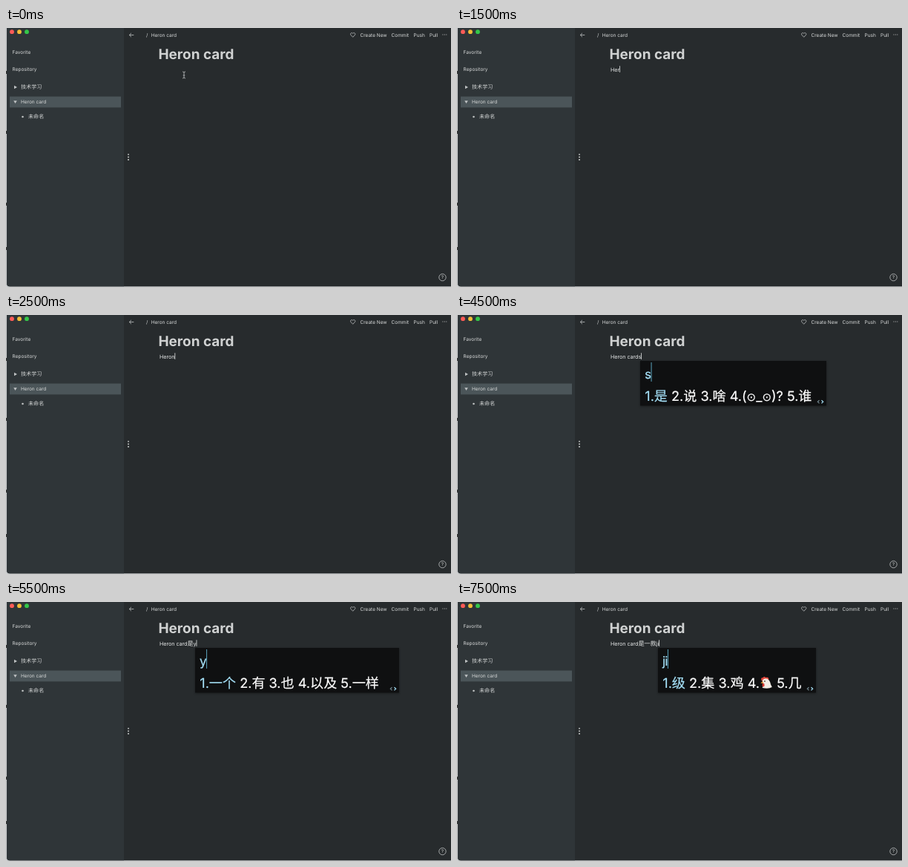
Animation of 600 by 350 pixels, one loop 8000 ms. Source, as an HTML page:

```html
<!DOCTYPE html>
<html lang="en">
<head>
<meta charset="utf-8">
<title>Note editor</title>
<style>
  html, body { margin: 0; width: 600px; height: 350px; overflow: hidden; background: #272b2d; }
  svg { display: block; }
  text { font-family: Inter, 'DejaVu Sans', 'Noto Sans CJK SC', 'Noto Sans CJK', sans-serif; fill: #d6d8d8; text-rendering: geometricPrecision; }
  .side text { font-size: 6.5px; }
  .side .cjk { font-size: 7.1px; }
  .bar text { font-size: 6.5px; }
  .title { font-size: 18.9px; font-weight: 700; fill: #d0d2d2; }
  #line { font-size: 7.2px; letter-spacing: -.05px; fill: #e8eaea; }
  #input { font-size: 17.2px; letter-spacing: -.9px; fill: #a5e0f7; stroke: #a5e0f7; stroke-width: .2; }
  #options { font-size: 18.1px; fill: #fff; stroke: #fff; stroke-width: .2; }
  #options .first { fill: #a5e0f7; stroke: #a5e0f7; }
  .icon { fill: none; stroke: #bfc2c3; stroke-width: .8; }
  .soft { fill: #bfc2c3; }
</style>
</head>
<body>
<svg width="600" height="350" viewBox="0 0 600 350">
  <defs>
    <filter id="shadow" x="-5%" y="-15%" width="110%" height="135%" color-interpolation-filters="sRGB">
      <feDropShadow dx="0" dy="1" stdDeviation="1.5" flood-opacity=".4"/>
    </filter>
  </defs>

  <rect width="600" height="350" fill="#c9cbcc"/>
  <path d="M0 58v4M0 139v4M0 236v4M0 296v4" stroke="#333" stroke-width="2"/>
  <path d="M1 0H600V349.2H5Q1 349.2 1 345Z" fill="#272b2d"/>
  <path d="M1 0H159V349.2H5Q1 349.2 1 345Z" fill="#2f3538"/>
  <circle cx="8" cy="5.2" r="2.9" fill="#fc5b57"/>
  <circle cx="18" cy="5.2" r="2.9" fill="#f2bd36"/>
  <circle cx="28" cy="5.2" r="2.9" fill="#34c749"/>

  <g class="side">
    <rect x="5" y="92.6" width="150" height="14.8" fill="#4b5559"/>
    <text x="8.6" y="35.2">Favorite</text>
    <text x="8.6" y="58.2">Repository</text>
    <text x="20" y="82.3" class="cjk">技术学习</text>
    <text x="20" y="102.2">Heron card</text>
    <text x="30" y="122.4" class="cjk">未命名</text>
    <path class="soft" d="M11 77.7L15 80L11 82.3ZM10.2 98.2H14.8L12.5 102Z"/>
    <circle class="soft" cx="22.5" cy="120" r="1.3"/>
  </g>

  <g class="bar">
    <path class="icon" d="M172.3 9.5H166.3M169 6.8L166.2 9.5L169 12.2"/>
    <text x="189" y="12.4">/</text>
    <text x="195.7" y="12.4">Heron card</text>
    <path class="icon" d="M467.7 12.3L465 9.5C463.6 7.6 466 5.3 467.7 7.4C469.4 5.3 471.8 7.6 470.4 9.5Z"/>
    <text x="477.5" y="11.6">Create New</text>
    <text x="519.5" y="11.6">Commit</text>
    <text x="549.5" y="11.6">Push</text>
    <text x="571" y="11.6">Pull</text>
    <path class="soft" d="M588.5 8.6h1v1h-1zM590.9 8.6h1v1h-1zM593.3 8.6h1v1h-1z"/>
    <g fill="#dcdede">
      <circle cx="165" cy="170.8" r=".9"/>
      <circle cx="165" cy="174.4" r=".9"/>
      <circle cx="165" cy="178" r=".9"/>
    </g>
    <circle class="icon" cx="588.5" cy="337" r="4.7"/>
    <text x="588.5" y="339.4" text-anchor="middle">?</text>
  </g>

  <text class="title" x="205.5" y="41.8">Heron card</text>
  <text id="line" x="207" y="58.5"></text>
  <rect id="caret" y="51.3" width=".8" height="8.6" fill="#e2e4e4"/>
  <path id="pointer" class="icon" d="M238 59Q240 59 240 60.5V66.5Q240 68 238 68M242 59Q240 59 240 60.5M240 66.5Q240 68 242 68M238.7 64H241.3"/>

  <g id="popup">
    <rect id="panel" y="62" height="60.5" fill="#0f1011" filter="url(#shadow)"/>
    <text id="input" x="6" y="86.2"></text>
    <rect id="inputCaret" y="64" width=".9" height="26" fill="#63b3d0"/>
    <text id="options" x="6.3" y="116.2"></text>
    <g id="pager" fill="none" stroke-width="1.2">
      <path d="M3 115.2L.8 117.3L3 119.4" stroke="#71858d"/>
      <path d="M6 115.2L8.2 117.3L6 119.4" stroke="#a5e0f7"/>
    </g>
    <g id="chicken" transform="translate(10 6) scale(.94)">
      <path d="M138 107Q136 102 140 102.5Q141 100 144 102Q149 101 148 106Z" fill="#e2473d"/>
      <path d="M139 107Q141 102.5 146 104Q150 106 151 112L153 116Q148 119 139 117Q141 113 139 107Z" fill="#f3eee6"/>
      <path d="M139.5 107.5L136.5 110.5L140.5 110.5Z" fill="#f2a33a"/>
      <ellipse cx="140.5" cy="113" rx="1.6" ry="2.6" fill="#d93b34"/>
      <circle cx="142.5" cy="107.5" r=".9" fill="#332b28"/>
    </g>
  </g>
</svg>
<script>
const $ = id => document.getElementById(id);
const show = (id, on) => $(id).setAttribute('visibility', on ? 'visible' : 'hidden');
const moveTo = (id, x) => $(id).setAttribute('transform', `translate(${x})`);

// Each step: typed line, caret shown, then popup x, width, input and options.
const steps = [
  ['', false],
  ['Her', true, 209, 116, 'Her', '1.Her 2.和'],
  ['Her', true],
  ['Heron', true],
  ['Heron', false],
  ['Heron cards', true, 247, 251, 's', '1.是 2.说 3.啥 4.(⊙_⊙)? 5.谁'],
  ['Heron card是y', true, 255, 275, 'y', '1.一个 2.有 3.也 4.以及 5.一样'],
  ["Heron card是yi'ku", true, 255, 285, "yi'ku", '1.移库 2.一哭 3.一库 4.衣裤 5.以'],
  ['Heron card是一款ji', true, 271, 213, 'ji', '1.级 2.集 3.鸡 4.\u3000 5.几'],
];

const sized = (text, pattern, size) =>
  text.replace(pattern, `<tspan font-size="${size}">$&</tspan>`);

function render(index) {
  const [line, caret, x, width, input, options] = steps[index];
  $('line').innerHTML = sized(line, /[一-龥]+/g, 8.2);
  $('caret').setAttribute('x', 207 + $('line').getComputedTextLength());
  show('caret', caret);
  show('pointer', index === 0);
  show('popup', input);
  show('chicken', input === 'ji');
  if (!input) return;
  moveTo('popup', x);
  moveTo('pager', width - 12.5);
  $('panel').setAttribute('width', width);
  $('input').textContent = input;
  $('inputCaret').setAttribute('x', 6.4 + $('input').getComputedTextLength());
  $('options').innerHTML = sized(options, /⊙/g, 15)
    .replace(/^\S+/, '<tspan class="first">$&</tspan>');
}

let current = -1;
function tick() {
  const index = Math.floor((performance.now() % 8000 + 500) / 1000);
  if (index !== current) render(current = index);
  requestAnimationFrame(tick);
}
tick();
</script>
</body>
</html>
```
